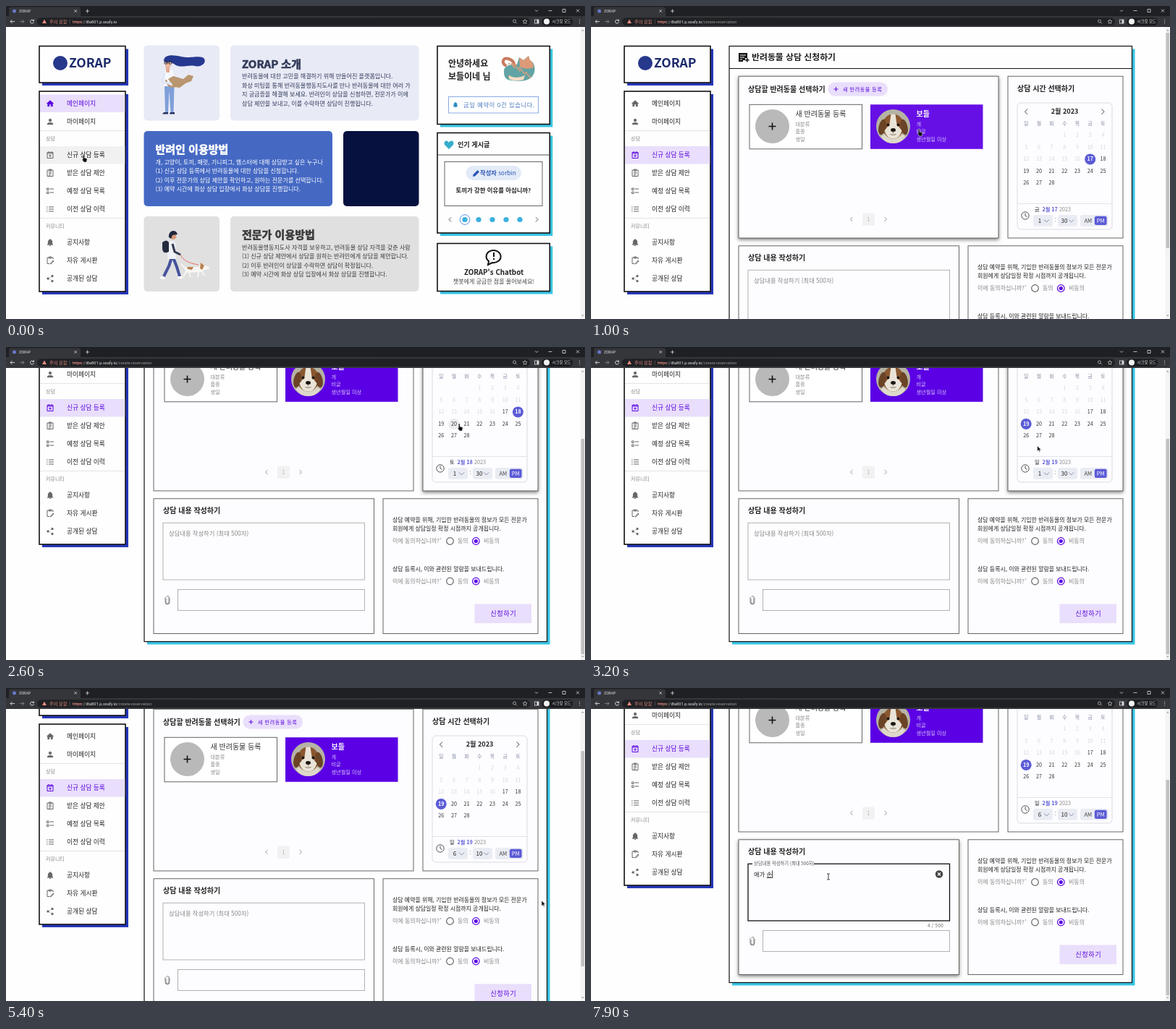
An HTML page that plays this animation: 800 px wide and 433 px high, repeating every 8000 ms.

```html
<!DOCTYPE html>
<html lang="ko">
<head>
<meta charset="utf-8">
<title>ZORAP</title>
<style>
html, body { margin: 0; width: 100%; height: 100%; overflow: hidden; background: #fefefe; }
svg { display: block; width: 800px; height: 433px; }
text { font-family: "Noto Sans CJK KR", "Noto Sans CJK JP", "Noto Sans CJK", "Noto Sans", sans-serif; white-space: pre; }
.ui { font-family: Roboto, "Noto Sans CJK KR", "Noto Sans CJK", sans-serif; }
</style>
</head>
<body>
<script>
const LOOP = 8000, STEP = 100;
const PURPLE = '#5b08e0', PALE = '#e9defb', BLUE = '#2537b8', CYAN = '#38c3e2', INDIGO = '#5b5bd6';
const INK = '#222', GREY = '#888';

function el(parent, tag, attrs = {}, text) {
  const node = document.createElementNS('http://www.w3.org/2000/svg', tag);
  set(node, attrs);
  if (text !== undefined) node.textContent = text;
  parent.appendChild(node);
  return node;
}
function set(node, attrs) { for (const k in attrs) node.setAttribute(k, attrs[k]); }
function show(node, on) { node.style.display = on ? '' : 'none'; }

const group = (p, x = 0, y = 0, s = 1) => el(p, 'g', { transform: `translate(${x} ${y}) scale(${s})` });
const rect = (p, x, y, x2, y2, fill, more = {}) =>
  el(p, 'rect', { x, y, width: x2 - x, height: y2 - y, fill, ...more });
const circle = (p, cx, cy, r, fill, more = {}) => el(p, 'circle', { cx, cy, r, fill, ...more });
const oval = (p, cx, cy, rx, ry, fill, more = {}) => el(p, 'ellipse', { cx, cy, rx, ry, fill, ...more });
const shape = (p, d, fill, more = {}) => el(p, 'path', { d, fill, ...more });
const line = (p, d, stroke, width = 1, more = {}) =>
  el(p, 'path', { d, fill: 'none', stroke, 'stroke-width': width, ...more });
// y is the middle of the line of text
const text = (p, x, y, s, size, fill = INK, more = {}) =>
  el(p, 'text', { x, y: y + size * .36, 'font-size': size, fill, ...more }, s);
const BOLD = { 'font-weight': 700 }, MID = { 'text-anchor': 'middle' };

function frame(p, x, y, x2, y2, shadow, width = 1.6) {
  rect(p, x + 4, y + 4, x2 + 4, y2 + 4, shadow);
  rect(p, x, y, x2, y2, '#fefefe', { stroke: '#111', 'stroke-width': width });
}
const card = (p, x, y, x2, y2) => rect(p, x, y, x2, y2, '#fdfcfe', { stroke: '#555', 'stroke-width': .9 });

// Keyed motion and stepped values
function ease(keys, t) {
  const i = keys.findIndex(k => k[0] > t);
  if (i < 0) return keys[keys.length - 1].slice(1);
  const a = keys[i - 1], b = keys[i], u = (t - a[0]) / (b[0] - a[0]);
  return a.slice(1).map((v, n) => v + (b[n + 1] - v) * u);
}
const pick = (keys, t) => keys.filter(k => k[0] <= t).pop()[1];
const within = (t, a, b) => t >= a && t < b;

const svg = el(document.body, 'svg', { viewBox: '0 0 800 433' });
rect(svg, 0, 0, 800, 433, '#fefefe');
const doc = group(svg);

// Sidebar
const ICONS = {
  home: 'M10 20v-6h4v6h5v-8h3L12 3 2 12h3v8z',
  person: 'M8 8a4 4 0 1 0 8 0a4 4 0 1 0-8 0M4 20v-2c0-5 16-5 16 0v2z',
  date: 'M4 5h16v16H4zM4 8h16M8 2v3M16 2v3M12 11v7M8.5 14.5h7',
  board: 'M4 4h16v17H4zM9 2h6v4H9zM8 10h8M8 14h8M8 18h5',
  check: 'M3 4h5v5H3zM3 14h5v5H3zM11 6h11M11 16h11',
  list: 'M2 6h3M2 12h3M2 18h3M8 6h14M8 12h14M8 18h14',
  bell: 'M4 19v-1l2-2v-5c0-4 2-6 4.5-6.4C10.5 2 13.5 2 13.5 4.6 16 5 18 7 18 11v5l2 2v1zM10 20h4a2 2 0 0 1-4 0',
  edit: 'M20 9V4H4v17h6M9 2h6v4H9zM13 20l7-8 2 2-7 7-3 1z',
  share: 'M15 5a3 3 0 1 0 6 0a3 3 0 1 0-6 0M3 12a3 3 0 1 0 6 0a3 3 0 1 0-6 0M15 19a3 3 0 1 0 6 0a3 3 0 1 0-6 0M8 11l9-5M8 13l9 5'
};
const SOLID = ['home', 'person', 'bell', 'share'];
function icon(p, name, x, y, color, size = 12) {
  const g = group(p, x - size / 2, y - size / 2, size / 24);
  const solid = SOLID.includes(name);
  return shape(g, ICONS[name], solid ? color : 'none', { stroke: color, 'stroke-width': solid ? .6 : 2 });
}

frame(doc, 46, 55.5, 165, 106, BLUE);
circle(doc, 75, 79, 10, '#26388c');
text(doc, 87, 79, 'ZORAP', 17.5, '#1b2a6b', BOLD);
frame(doc, 46, 118, 165, 395, BLUE);
const hoverRow = rect(doc, 47, 194, 164.2, 218.5, '#f1f1f1');
const activeRow = rect(doc, 47, 122.5, 164.2, 147, PALE);
line(doc, 'M47 172.5H164M47 293.5H164', '#ddd', .8);
text(doc, 55, 183, '상담', 7, GREY);
text(doc, 55, 304, '커뮤니티', 7, GREY);
const menu = [
  ['home', '메인페이지', 135], ['person', '마이페이지', 160], ['date', '신규 상담 등록', 206],
  ['board', '받은 상담 제안', 231], ['check', '예정 상담 목록', 256], ['list', '이전 상담 이력', 281],
  ['bell', '공지사항', 327], ['edit', '자유 게시판', 352], ['share', '공개된 상담', 377]
].map(([name, label, y]) => ({
  name, icon: icon(doc, name, 61, y, '#666'), label: text(doc, 84, y, label, 8.7, INK)
}));
function paintMenu(active) {
  menu.forEach((m, i) => {
    const on = i === active, c = on ? PURPLE : '#666';
    set(m.icon, { stroke: c, fill: SOLID.includes(m.name) ? c : 'none' });
    set(m.label, { fill: on ? PURPLE : INK });
  });
  set(activeRow, { y: active ? 194 : 122.5 });
}

// Home page
const home = group(doc);
function tile(x, y, x2, fill, color, title, lines) {
  rect(home, x, y, x2, y + 104, fill, { rx: 5 });
  if (!title) return;
  text(home, x + 16, y + 26, title, 15, color, { 'font-weight': 900, stroke: color, 'stroke-width': .6 });
  lines.forEach((s, i) => text(home, x + 16, y + 42.7 + i * 12.5, s, 8.05, color));
}
const LAST = '(3) 예약 시간에 화상 상담 입장에서 화상 상담을 진행합니다.';
const LILAC = '#e8eaf6', NAVY = '#07113f', ASH = '#e0e0e0', COAL = '#3a3a3a';
tile(190.5, 54.5, 295, LILAC);
tile(310, 54.5, 570.5, LILAC, '#323a58', 'ZORAP 소개', [
  '반려동물에 대한 고민을 해결하기 위해 만들어진 플랫폼입니다.',
  '화상 미팅을 통해 반려동물행동지도사를 만나 반려동물에 대한 여러 가',
  '지 궁금증을 해결해 보세요. 반려인이 상담을 신청하면, 전문가가 이에',
  '상담 제안을 보내고, 이를 수락하면 상담이 진행됩니다.']);
tile(190.5, 173, 451, '#4569c3', '#fff', '반려인 이용방법', [
  '개, 고양이, 토끼, 패럿, 기니피그, 햄스터에 대해 상담받고 싶은 누구나',
  '(1) 신규 상담 등록에서 반려동물에 대한 상담을 신청합니다.',
  '(2) 이후 전문가의 상담 제안을 확인하고, 원하는 전문가를 선택합니다.', LAST]);
tile(466, 173, 570.5, NAVY);
tile(190.5, 291, 295, ASH);
tile(310, 291, 570.5, ASH, COAL, '전문가 이용방법', [
  '반려동물행동지도사 자격을 보유하고, 반려동물 상담 자격을 갖춘 사람',
  '(1) 신규 상담 제안에서 상담을 원하는 반려인에게 상담을 제안합니다.',
  '(2) 이후 반려인이 상담을 수락하면 상담이 확정됩니다.', LAST]);

// Woman holding a cat
const woman = group(home);
shape(woman, 'M219 110l1 37h4l1.500-30 2 30h4l1-37z', '#7f9fd8');
shape(woman, 'M218 147h6v2.500h-8zM227 147h6v2.500h-7z', '#26315f');
shape(woman, 'M219 90c3-3 9-3 12 0l2 21h-15z', '#f6f8ff');
shape(woman, 'M221 84h5v8h-5z', '#e3a994');
shape(woman, 'M220 72h8v11q-4 5-8 2z', '#eeb8a0');
shape(woman, 'M218 76c0-9 12-9 24-6s28-3 32 3c3 6-4 12-13 10s-18 3-26-1c-6-4-10-6-13-3z', '#26388f');
line(woman, 'M219 77h4v3h-4zM225 77h4v3h-4z', '#222', .8);
shape(woman, 'M224 101l7-4 14 4 7-6 7 2-3 7-8 3-8 6-8-1z', '#b9966f');
line(woman, 'M233 111c-8 2-10-3-12-8', '#b9966f', 2.5, { 'stroke-linecap': 'round' });
line(woman, 'M219 93l-3 12 13 3', '#dfe5f8', 3, { 'stroke-linejoin': 'round' });

// Man walking a dog
const man = group(home);
line(man, 'M229 348l-4 12-7 14M231 348l5 13 4 13', '#46539c', 4);
shape(man, 'M214 374l6 2-1 2-6-1zM238 374h6v3h-7z', '#fff');
shape(man, 'M223 327q7-4 11 0l1 23h-12z', '#eef1f5');
shape(man, 'M216 327q6-5 9 0v13q-8 4-9-4z', '#252b3e');
line(man, 'M230 329l3 11 8 4', '#31384f', 3);
circle(man, 231, 318.5, 4.5, '#d99b7c');
shape(man, 'M225 320c-1-10 10-12 12-4l-7 1-2 5z', '#20283d');
line(man, 'M241 344q4 11 25 14', '#e8574a', .8);
shape(man, 'M246 361h20l4-5 5 3 6 2-1 3-6 1-3 3-22 1z', '#f8f6f2');
shape(man, 'M269 355l5 4-3 6-3-2zM250 361h9l-2 4-6-1z', '#b98250');
line(man, 'M249 367l-4 7M253 368l2 7M266 368l-1 7M270 366l4 7M247 362l-5-5', '#f8f6f2', 1.8);

// Greeting
frame(home, 596, 55.5, 751.3, 163.5, CYAN);
text(home, 611, 79.5, '안녕하세요', 12, INK, BOLD);
text(home, 611, 98, '보들이네 님', 12, INK, BOLD);
const cat = group(home);
shape(cat, 'M688 91c0-10 10-10 18-10l3-10 6 4 7-6 2 6c8 4 8 16 4 21-6 10-22 8-30 7s-10-5-10-12z', '#62a3a4');
line(cat, 'M690 82c-6-4-3-11 4-9s7 5 9 9', '#c9795f', 4, { 'stroke-linecap': 'round' });
shape(cat, 'M709 71l6 4 7-6 2 6q5 3 5 10-10 4-19-1z', '#dc9a78');
for (let i = 0; i < 20; i++) circle(cat, 695 + i * 7.3 % 31, 80 + i * 4.7 % 21, 1.2, '#d9a07c');
shape(cat, 'M695 96q9 6 22 0l-2 6q-12 3-20-1z', '#f3dcc4');
rect(home, 611.5, 125.5, 735.5, 148, '#fff', { stroke: '#7da3e0', 'stroke-width': .9 });
icon(home, 'bell', 621, 136.5, '#2b8cc4', 9);
text(home, 632, 136.8, '금일 예약이 0건 있습니다.', 8.2, '#4a78bd', { 'letter-spacing': .65 });

// Popular posts
frame(home, 596, 175.5, 751.3, 314, CYAN);
shape(home, 'M612 198l-6-6c-2-6 4-7 6-3 2-4 8-3 6 3z', '#36aecb');
text(home, 624, 192, '인기 게시글', 9.1, INK, BOLD);
line(home, 'M597 206H750.5', '#222', .8);
rect(home, 606, 215.5, 741, 276.5, '#fff', { stroke: '#555', 'stroke-width': .9 });
rect(home, 635.5, 221, 712, 241, '#e2ebf7', { rx: 10 });
shape(home, 'M645 236l.6-3 6-6 2.4 2.4-6 6z', '#2d57b5');
const author = text(home, 655, 231, '작성자 ', 8.3, '#2d57b5', BOLD);
el(author, 'tspan', { 'font-weight': 400 }, 'sorbin');
text(home, 673.5, 254.5, '토끼가 강한 이유를 아십니까?', 8.4, INK, { ...BOLD, ...MID });
for (let i = 0; i < 5; i++) circle(home, 634 + i * 19, 295.5, 3.6, '#3bb0df');
circle(home, 634, 295.5, 6.8, 'none', { stroke: '#4c86dc', 'stroke-width': .9 });
line(home, 'M615 292.5l-3 3 3 3M732 292.5l3 3-3 3', '#555');

// Chatbot
frame(home, 596, 328.5, 751.3, 394.5, CYAN);
shape(home, 'M667 353a10 8.5 0 1 1 5 2l-6 3z', 'none', { stroke: '#111', 'stroke-width': 2 });
line(home, 'M674 341v6M674 349v2', '#111', 2);
text(home, 674, 368, "ZORAP's Chatbot", 9.8, INK, { ...BOLD, ...MID });
text(home, 674, 381.5, '챗봇에게 궁금한 점을 물어보세요!', 8, '#444', MID);

// Reservation page
const form = group(doc);
frame(form, 191, 55.5, 747.5, 529.5, CYAN, 1.2);
line(form, 'M191 86.5H747.5', '#111', 1.1);
shape(form, 'M204 65h12v7h-3v3h-3v2h-6zM213 74h2v-2h1.5v2h2v1.5h-2v2H215v-2h-2z', '#111');
line(form, 'M206 68h8M206 71h6M206 74h3', '#fff', 1);
text(form, 222, 70.5, '반려동물 상담 신청하기', 11.9, INK, BOLD);

const pets = card(form, 204, 97.2, 563, 321);
const times = card(form, 576, 97.2, 735, 321);
const notes = card(form, 204, 331.8, 508.5, 518.5);
card(form, 521, 331.8, 735, 518.5);

text(form, 217, 115, '상담할 반려동물 선택하기', 10, INK, BOLD);
rect(form, 327.5, 105.5, 410, 124.5, PALE, { rx: 9.5 });
line(form, 'M335.5 115h6M338.5 112v6', PURPLE, 1);
text(form, 348, 115, '새 반려동물 등록', 7, PURPLE, { 'letter-spacing': .6 });
function petCard(x, name, subs) {
  const box = rect(form, x, 136.3, x + 155.5, 197.8, '#fff', { stroke: '#555', 'stroke-width': .9 });
  const title = text(form, x + 63.5, 149.7, name, 10, '#333');
  return { box, title, subs: subs.map((s, i) => text(form, x + 63.5, 163 + i * 10.5, s, 7.2, GREY)) };
}
petCard(219, '새 반려동물 등록', ['대분류', '품종', '생일']);
circle(form, 250.5, 166.5, 23.5, '#b9b9b9');
line(form, 'M245.5 166.5h10M250.5 161.5v10', '#111', 1.6);
const pet = petCard(386, '보들', ['개', '비글', '생년월일 미상']);

// Puppy portrait
const dog = group(form, 417.5, 166.5);
circle(dog, 0, 0, 23.5, '#b5b3a4');
shape(dog, 'M-17 14q17-13 34 0-6 9.500-17 9.500t-17-9.500z', '#ded8ca');
oval(dog, 0, 0, 15, 17, '#8a5730');
oval(dog, -15, 1, 5, 11, '#6b4326', { transform: 'rotate(12 -15 1)' });
oval(dog, 15, 1, 5, 11, '#6b4326', { transform: 'rotate(-12 15 1)' });
shape(dog, 'M-3-17h6l2 14 7 9q-3 11-12 11t-12-11l7-9z', '#eae4d8');
circle(dog, -7, -2, 2, '#1a1512');
circle(dog, 7, -2, 2, '#1a1512');
oval(dog, 0, 5, 3.5, 2.5, '#1a1512');
line(dog, 'M0 7v3M-4 11q4 2 8 0', '#6b5547', .8);

line(form, 'M361.5 292l-3 3 3 3M405.5 292l3 3-3 3', '#999', 1);
rect(form, 375, 286.5, 392, 304, '#f2f2f3', { rx: 2 });
text(form, 383.5, 295.5, '1', 8, '#bbb', MID);

// Calendar
text(form, 589, 114.5, '상담 시간 선택하기', 10, INK, BOLD);
rect(form, 589, 134, 720, 309, '#fdfcfe', { rx: 5, stroke: '#d6d9e0', 'stroke-width': .9 });
line(form, 'M603 142.5l-3.5 3.7 3.5 3.7M705.5 142.5l3.5 3.7-3.5 3.7', '#444');
text(form, 654.5, 146, '2월 2023', 9.1, INK, { ...BOLD, ...MID });
const cellX = d => 601.2 + 17.7 * ((d + 2) % 7);
const cellY = d => 178.9 + 16.5 * Math.floor((d + 2) / 7);
[...'일월화수목금토'].forEach((s, i) => text(form, 601.2 + 17.7 * i, 162, s, 7, '#858ea3', MID));
const hoverDay = circle(form, cellX(20), cellY(20), 7.7, '#ebebf0');
const chosenDay = circle(form, 0, 0, 7.5, INDIGO);
const days = Array.from({ length: 28 }, (_, i) =>
  text(form, cellX(i + 1), cellY(i + 1), i + 1, 7.2, INK, MID));
line(form, 'M589 273.5H720', '#dcdfe5', .8);
circle(form, 600, 290, 5.2, 'none', { stroke: '#444', 'stroke-width': .9 });
line(form, 'M600 286.5v3.5l2.5 1.5', '#444', .9);
const weekday = text(form, 613, 281.5, '', 7.2, INK);
const dayLabel = text(form, 623.5, 281.5, '', 7.2, INDIGO, BOLD);
text(form, 647, 281.5, '2023', 7.2, GREY);
function select(x) {
  const box = rect(form, x, 289, x + 27, 304.8, '#eaecf3', { rx: 3 });
  line(form, `M${x + 15} 295.5l3.5 3.5 3.5-3.5`, '#7780a0', .9);
  return { box, value: text(form, x + 9, 297, '', 8, INK, MID) };
}
const hour = select(611), minute = select(645);
text(form, 641.3, 296.5, ':', 8, GREY, MID);
rect(form, 676, 289, 714.5, 304.8, '#eaecf3', { rx: 3 });
rect(form, 695.8, 290.8, 712.6, 303, INDIGO, { rx: 2.5 });
text(form, 686.8, 297, 'AM', 7.6, '#444', MID);
text(form, 704.2, 297, 'PM', 7.6, '#fff', MID);

// Notes
const HINT = '상담내용 작성하기 (최대 500자)';
text(form, 217, 348.5, '상담 내용 작성하기', 10, INK, BOLD);
const area = rect(form, 217, 365.3, 495.5, 444, 'none');
const notch = rect(form, 223, 363, 308, 368, '#fdfcfe');
const hint = text(form, 225, 0, HINT, 8.3, GREY);
const typed = text(form, 225, 379.7, '', 8.3, INK);
const caret = rect(form, 0, 374.5, .8, 385, '#111');
const under = rect(form, 0, 384.2, 7.6, 384.9, '#111');
const counter = text(form, 487, 451.2, '', 6.3, '#666', { 'text-anchor': 'end', 'letter-spacing': .3 });
const clear = group(form, 481, 379.5);
circle(clear, 0, 0, 5.2, '#444');
line(clear, 'M-2-2l4 4M2-2l-4 4', '#fff', 1.1);
rect(form, 237.5, 457.5, 495.5, 486.5, 'none', { stroke: '#aaa', 'stroke-width': .9 });
line(form, 'M221 470v5a2 2 0 0 0 4 0v-7a1.5 1.5 0 0 0-3 0M220 468v7a3 3 0 0 0 6 0v-6', '#777', .9);

// Consent
text(form, 534, 361, '상담 예약을 위해, 기입한 반려동물의 정보가 모든 전문가', 7.95);
text(form, 534, 373.5, '회원에게 상담일정 확정 시점까지 공개됩니다.', 7.95);
text(form, 534, 429, '상담 등록시, 이와 관련된 알람을 보내드립니다.', 7.95);
for (const y of [390.5, 446]) {
  text(form, 534, y, '이에 동의하십니까?', 8, GREY);
  text(form, 599, y - 1.5, '*', 6, GREY);
  circle(form, 613.5, y, 4.8, 'none', { stroke: '#666', 'stroke-width': 1.2 });
  text(form, 624, y, '동의', 8, GREY);
  circle(form, 649.3, y, 4.8, 'none', { stroke: PURPLE, 'stroke-width': 1.2 });
  circle(form, 649.3, y, 2.6, PURPLE);
  text(form, 660, y, '비동의', 8, GREY);
}
rect(form, 647.5, 477.5, 726, 504, PALE);
text(form, 687.3, 490.5, '신청하기', 9.2, PURPLE, { ...MID, 'letter-spacing': .6 });

// Scrollbar
rect(svg, 793.5, 29, 800, 433, '#f4f4f4');
const thumb = rect(svg, 794.5, 37, 799, 335, '#c1c1c1');
shape(svg, 'M795 34.5l1.8-2 1.8 2zM795 427.5l1.8 2 1.8-2z', '#999');

// Browser bars
const UI = { class: 'ui' };
rect(svg, 0, 0, 800, 15, '#1f2023');
rect(svg, 4, 1.5, 103, 18, '#35363a', { rx: 3 });
rect(svg, 0, 14, 800, 29, '#35363a');
circle(svg, 11.5, 7, 2.5, '#6878c8');
text(svg, 18, 7, 'ZORAP', 5, '#e8e8e8', UI);
line(svg, 'M94.5 5.2l3.4 3.4M97.9 5.2l-3.4 3.4M110 7h5M112.5 4.5v5', '#ddd', .8);
line(svg, 'M731 5.5l2 2 2-2M749.5 6.5h5M769 4.5h4v4h-4zM788 4.5l4 4M792 4.5l-4 4', '#ddd', .8);
rect(svg, 43, 16.3, 724, 27, '#202124', { rx: 5.3 });
line(svg, 'M12 21.5H6M8.5 19l-2.5 2.5 2.5 2.5', '#ddd', .9);
line(svg, 'M19 21.5h6M22.5 19l2.5 2.5-2.5 2.5', '#888', .9);
line(svg, 'M38 20a2.5 2.5 0 1 0 .5 2M38.5 18.5v2h-2', '#ddd', .9);
shape(svg, 'M50 24l3-5.5 3 5.5z', '#e58a80');
text(svg, 60, 21.5, '주의 요함', 6.2, '#e58a80');
line(svg, 'M88.3 18.5v6', '#666', .6);
const url = text(svg, 92, 21.5, '', 5.7, '#e8e8e8', UI);
el(url, 'tspan', { fill: '#e58a80', 'text-decoration': 'line-through' }, 'https');
el(url, 'tspan', { fill: '#999' }, '://');
el(url, 'tspan', {}, 'i8a801.p.ssafy.io');
const path = el(url, 'tspan', { fill: '#999' });
circle(svg, 702.5, 21, 2, 'none', { stroke: '#ccc', 'stroke-width': .7 });
line(svg, 'M704 22.5l2 2M717 18.5l.9 2 2.1.2-1.6 1.5.5 2.1-1.9-1.1-1.9 1.1.5-2.1-1.6-1.5 2.1-.2z', '#ccc', .7);
rect(svg, 730.5, 19, 736, 24, 'none', { stroke: '#ddd', 'stroke-width': .8 });
rect(svg, 733.5, 19, 736, 24, '#ddd');
rect(svg, 740.5, 16.3, 783, 27, '#1b1c1f', { rx: 5.3 });
circle(svg, 747, 21.5, 4, '#f1f1f1');
text(svg, 754.5, 21.5, '시크릿 모드', 5.4, '#eee');
for (const y of [19, 21.5, 24]) circle(svg, 792.5, y, .6, '#ddd');

// Pointer
const pointer = group(svg);
const EDGE = { stroke: '#fff', 'stroke-width': .5 };
const looks = {
  hand: shape(pointer, 'M2.2 0c.6 0 1 .4 1 1v3l3 .7c.6.2.9.6.8 1.2L6.4 10H2.6L0 6.4l.8-.6.4.4V1c0-.6.4-1 1-1z', '#111', EDGE),
  arrow: shape(pointer, 'M0 0v7.6l1.8-1.6 1.2 2.7 1.2-.5L3 5.6h2.4z', '#111', EDGE),
  beam: line(pointer, 'M-2-4h1.6l.4.4.4-.4H2M0-3.6V3.6M-2 4h1.6l.4-.4.4.4H2', '#222', .9)
};

const MOVES = [[0, 105, 206], [200, 105, 206], [500, 300, 190], [800, 451, 170], [1200, 451, 170],
  [1500, 705, 210], [1700, 705, 210], [1900, 765, 227], [2100, 765, 227], [2500, 624, 106],
  [2700, 624, 106], [2900, 600, 105], [3100, 600, 105], [3400, 650, 200], [3700, 625, 292],
  [4000, 625, 292], [4400, 668, 290], [4700, 668, 290], [5000, 740, 294], [5500, 740, 294],
  [6000, 345, 256], [6400, 345, 256], [7000, 328, 261]];
const LOOKS = [[0, 'hand'], [400, 'arrow'], [700, 'hand'], [1300, 'arrow'], [1500, 'hand'], [1800, 'arrow'],
  [2500, 'hand'], [3200, 'arrow'], [3600, 'hand'], [4900, 'arrow'], [6000, 'beam']];
const SCROLL = [[0, 0], [2100, 0], [2400, 122], [3200, 122], [3500, 0], [5200, 0], [5400, 68], [5600, 122]];
const DATE = [[0, 17], [1600, 18], [2900, 19]];
const TYPING = ['', 'ㅇ', '애', '애ㄱ', '애가', '애가 ', '애가 ㅅ', '애가 소', '애가 손'];
const OPENED = 200, CHOSEN = 900, FOCUS = 6100, TYPE = 7200;

const lift = (node, on) => { node.style.filter = on ? 'drop-shadow(0 2px 2.5px rgba(0,0,0,.5))' : ''; };

function paintForm(t) {
  lift(pets, within(t, 700, 1300));
  lift(times, within(t, 1400, 1900) || within(t, 2500, 4900));
  lift(notes, t >= 5900);

  const chosen = t >= CHOSEN, fill = t < 1300 ? '#6610e6' : '#5b00e4';
  set(pet.box, chosen ? { fill, stroke: 'none' } : { fill: '#fff', stroke: '#555' });
  set(pet.title, { fill: chosen ? '#fff' : '#333', 'font-weight': chosen ? 700 : 400 });
  pet.subs.forEach(s => set(s, { fill: chosen ? '#d5c2fa' : GREY }));

  const date = pick(DATE, t);
  set(chosenDay, { cx: cellX(date), cy: cellY(date) });
  show(hoverDay, within(t, 2500, 2800));
  days.forEach((d, i) => set(d, {
    fill: i + 1 === date ? '#fff' : i < 16 ? '#d5d7de' : '#333',
    'font-weight': i + 1 === date ? 700 : 400
  }));
  weekday.textContent = '일월화수목금토'[(date + 2) % 7];
  dayLabel.textContent = `2월 ${date}`;
  hour.value.textContent = t < 4000 ? 1 : 6;
  minute.value.textContent = t < 4800 ? 30 : 10;
  const picking = within(t, 4400, 4800);
  set(minute.box, { stroke: picking ? INDIGO : 'none', 'stroke-dasharray': '1.5 .8', 'stroke-width': .7,
    fill: picking ? '#fdfcfe' : '#eaecf3' });
  set(minute.value, { fill: picking ? GREY : INK });

  const k = Math.min(1, Math.max(0, (t - FOCUS) / 200)), focus = k > 0;
  const size = 8.3 - 2 * k;
  set(area, { stroke: focus ? '#111' : '#aaa', 'stroke-width': focus ? 1.3 : .9 });
  set(hint, { 'font-size': size, y: 379.7 - 14.5 * k + size * .36, fill: focus ? '#555' : GREY });
  show(notch, focus);
  const s = TYPING[Math.min(8, Math.max(0, Math.floor((t - TYPE) / STEP) + 1))];
  typed.textContent = s;
  const end = 225 + (s ? typed.getComputedTextLength() : 0);
  set(caret, { x: end });
  show(caret, focus && (s || t % 1000 < 500));
  set(under, { x: end - 7.6 });
  show(under, s && !s.endsWith(' '));
  show(clear, s);
  counter.textContent = focus ? `${s.length} / 500` : '';
}

function render(t) {
  const opened = t >= OPENED;
  const [scroll] = ease(SCROLL, t);
  const [x, y] = ease(MOVES, t);
  set(doc, { transform: `translate(0 ${-scroll})` });
  set(thumb, { y: 37 + scroll * 90 / 122 });
  set(pointer, { transform: `translate(${x} ${y})` });
  const look = pick(LOOKS, t);
  for (const name in looks) show(looks[name], name === look);
  show(home, !opened);
  show(form, opened);
  show(thumb, opened);
  show(hoverRow, !opened);
  path.textContent = opened ? '/create-reservation' : '';
  paintMenu(opened ? 2 : 0);
  if (opened) paintForm(t);
}

const start = performance.now();
function tick() {
  const t = (performance.now() - start) % LOOP;
  render(Math.floor(t / STEP) * STEP);
  requestAnimationFrame(tick);
}
tick();
</script>
</body>
</html>
```
